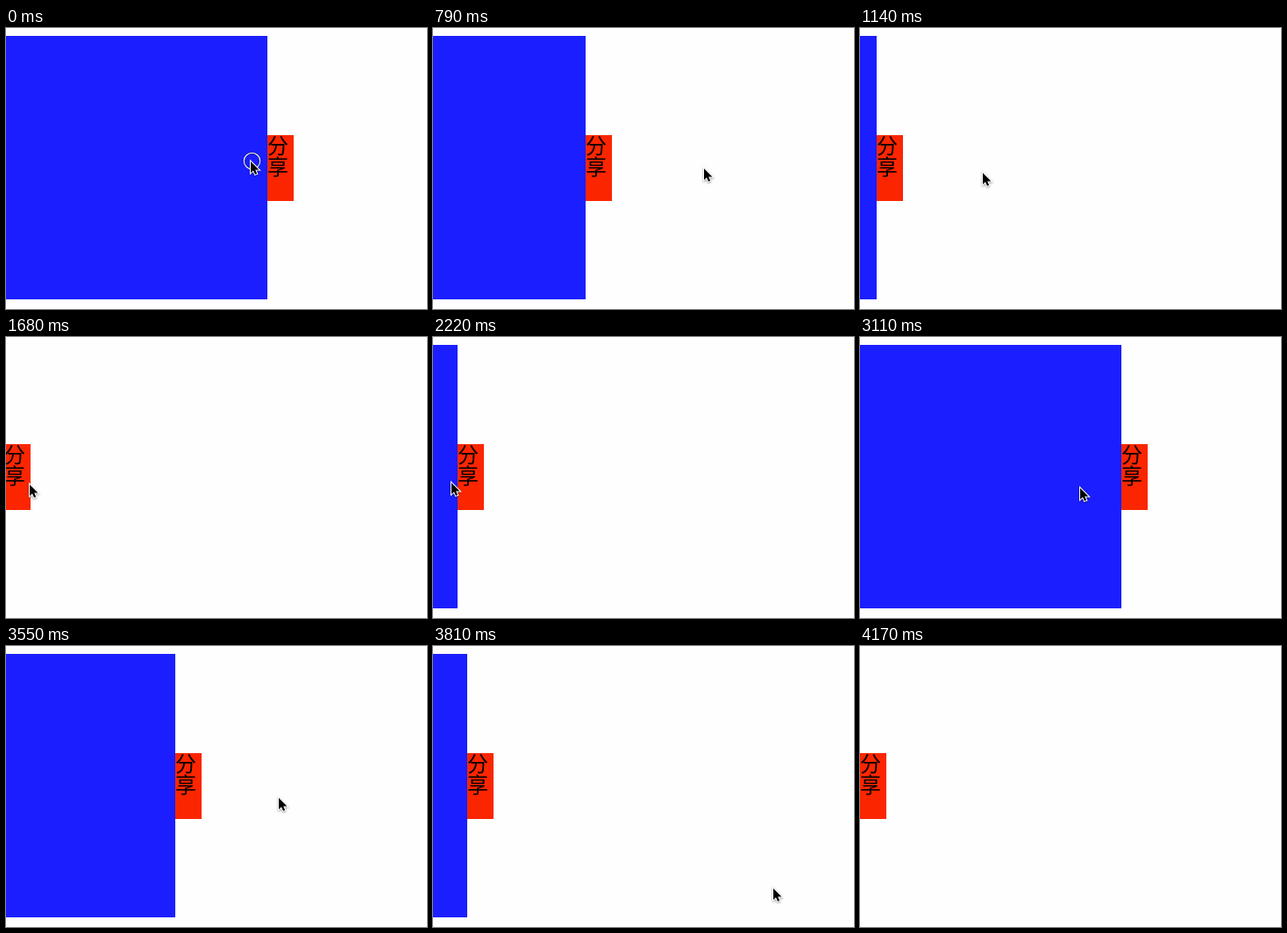
These frames come from a looping animation (480 px wide and 320 px high, 4.85 s). An HTML page:

```html
<!DOCTYPE html>
<html lang="zh">
<head>
<meta charset="utf-8">
<style>
html, body { margin: 0; height: 100%; overflow: hidden; background: #fefefe; }
svg { display: block; width: 480px; height: 320px; }
text { font: 300 24px "Noto Sans CJK SC", "Noto Sans CJK", sans-serif; }
#arrow { stroke: #fff; stroke-width: 2; paint-order: stroke; filter: drop-shadow(0 1px 1px #0006); }
</style>
</head>
<body>
<svg viewBox="0 0 480 320">
  <g id="panel">
    <rect x="-300" y="9" width="300" height="300" fill="#1b1fff"/>
    <rect y="122" width="30" height="75" fill="#fb2600"/>
    <text y="142.5">分</text>
    <text y="166.5">享</text>
  </g>
  <g id="ring" fill="none">
    <circle cx="280.5" cy="151.5" r="9.2" stroke="#0008" stroke-width="2.2"/>
    <circle cx="280.5" cy="151.5" r="9.2" stroke="#fff" stroke-width="1.1"/>
  </g>
  <path id="arrow" d="M1 2v13l3-2.8 2 4.6 2.2-.9-2-4.4h4.3z"/>
</svg>
<script>
const LOOP = 4850, STEP = 88.7, LEAD = 14;
const OPEN = 298, CLOSED = -2;
const $ = id => document.getElementById(id);

// Panel slides: start step, ticks per step, final edge
const slides = [[7.91, 4.6, CLOSED], [24.78, 4.5, OPEN], [39.12, 4.6, CLOSED]];

// Pointer moves: start step, end step, final x and y
const moves = [[0, 6, 308, 158], [9, 20, 24, 166], [20, 25, 20, 164], [29, 40, 310, 171], [40, 47, 425, 324]];

// Each tick covers a tenth of the distance left, rounded up
function remaining(ticks) {
  let d = OPEN - CLOSED;
  for (; ticks >= 1 && d > 0; ticks--) d -= Math.ceil(d / 10);
  return Math.round(d - Math.ceil(d / 10) * Math.min(ticks, 1));
}

function panelEdge(n) {
  const slide = slides.findLast(s => s[0] <= n);
  if (!slide) return OPEN;
  const [start, rate, end] = slide, d = remaining((n - start) * rate);
  return end === OPEN ? end - d : end + d;
}

function pointer(n) {
  let x = 278, y = 150;
  for (const [start, end, toX, toY] of moves) {
    const f = Math.min(Math.max((n - start) / (end - start), 0), 1);
    const ease = 1 - (1 - f) ** 2;
    x += (toX - x) * ease;
    y += (toY - y) * ease;
  }
  return [Math.round(x), Math.round(y)];
}

function draw(now) {
  // The screen is refreshed in discrete steps
  const n = Math.floor((now % LOOP + LEAD) / STEP);
  $("panel").setAttribute("transform", `translate(${panelEdge(n)})`);
  $("arrow").setAttribute("transform", `translate(${pointer(n)})`);
  $("ring").style.display = n < 1 ? "" : "none";
}

let start;
function tick(now) {
  start ??= now;
  draw(now - start);
  requestAnimationFrame(tick);
}
draw(0);
requestAnimationFrame(tick);
</script>
</body>
</html>
```
